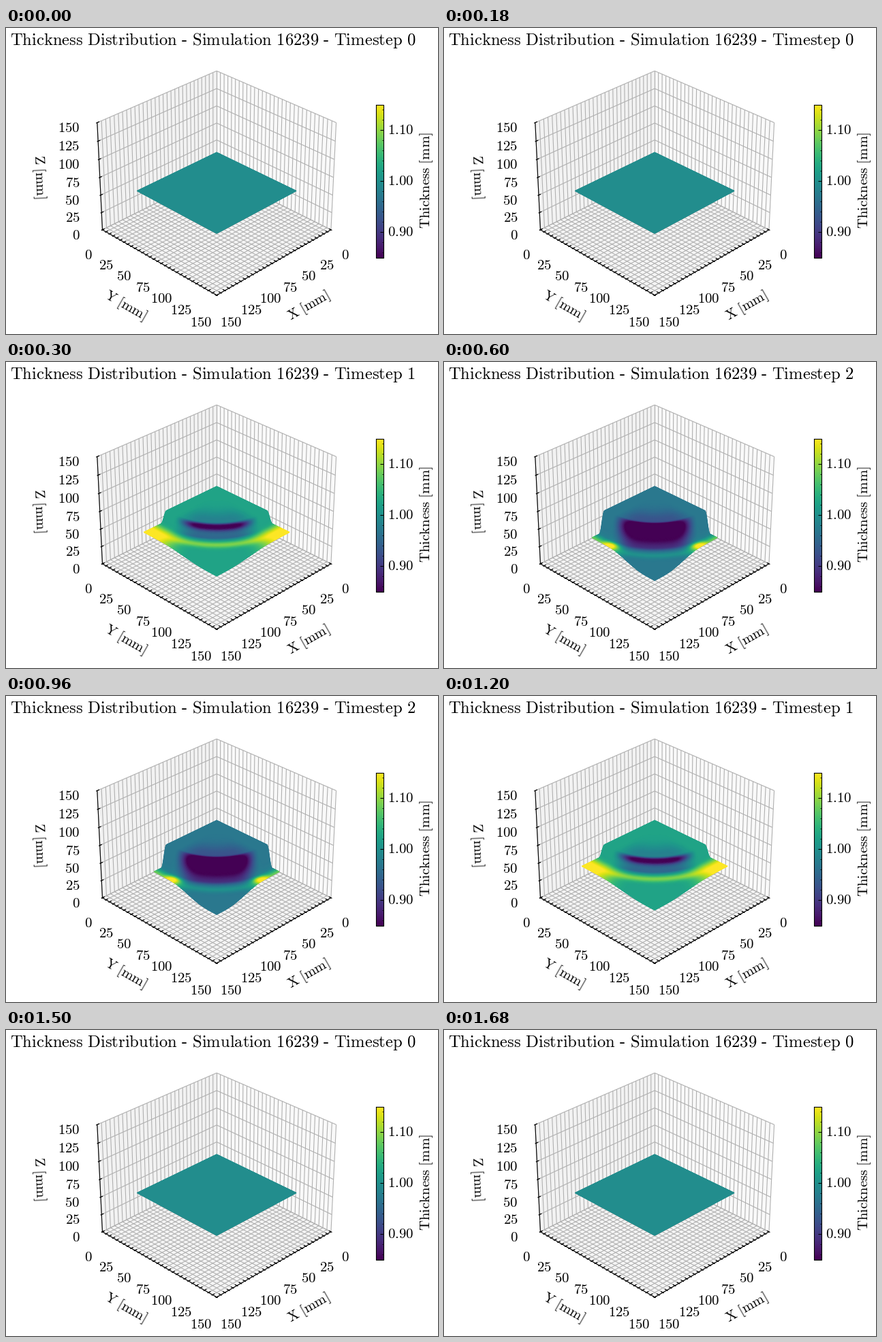
These frames come from a looping animation (634x450 px, 1800 ms). A matplotlib script:

```python
import numpy as np
import matplotlib.pyplot as plt
from matplotlib.animation import FuncAnimation
from matplotlib.collections import LineCollection

plt.rcParams["mathtext.fontset"] = "cm"

W, H, DPI = 634, 450, 100
CENTER, SCALE = (309.2, 219.7), 2037
SIZE = 150
TEXT, TITLE = 15, 17.75
FRAMES = 6

fig = plt.figure(figsize=(W / DPI, H / DPI), dpi=DPI, facecolor="white")
ax = fig.add_axes([0, 0, 1, 1])
ax.axis("off")


def project(x, y, z):
    """Perspective view from elevation 30, azimuth 45, in stage pixels."""
    x, y, z = (np.asarray(v, float) / SIZE - 0.5 for v in (x, y, z))
    x, y, z = 1.19048 * x, 1.19048 * y, 0.89286 * z
    along = (x + y) * np.sqrt(0.5)
    right = (y - x) * np.sqrt(0.5)
    up = -0.5 * along + 0.86603 * z
    depth = 10 - 0.86603 * along - 0.5 * z
    return CENTER[0] + SCALE * right / depth, CENTER[1] - SCALE * up / depth


def tex(s):
    return "$" + r"\ ".join(r"\text{%s}" % w for w in s.split()) + "$"


def write(x, y, s, size=TEXT, ha="center", va="center", rot=0):
    return ax.text(x, y, tex(s), fontsize=size, ha=ha, va=va, rotation=rot,
                   color="black", zorder=6)


def lines(segments, color, lw, z, snap=None):
    ax.add_collection(LineCollection(segments, colors=color, linewidths=lw,
                                     zorder=z, snap=snap), autolim=False)


def seg(p, q):
    return [project(*p), project(*q)]


def smooth(t):
    t = np.clip(t, 0, 1)
    return t * t * (3 - 2 * t)


def bump(v, mid, width):
    return np.exp(-((v - mid) / width) ** 2)


def draw_pane(p, q, gray):
    """Fill the face spanned by p and q from the far lower corner."""
    p, q = np.array(p), np.array(q)
    corners = [0 * p, p, p + q, q]
    ax.fill(*zip(*(project(*c) for c in corners)), color=str(gray), lw=0,
            zorder=1)


def draw_box():
    n, out, inn = SIZE, SIZE + 1.25, SIZE - 2.5
    draw_pane((0, n, 0), (0, 0, n), 0.975)
    draw_pane((n, 0, 0), (0, 0, n), 0.95)
    draw_pane((n, 0, 0), (0, n, 0), 0.9625)

    grid, ticks = [], []
    for v in range(0, n + 1, 5):
        grid += [seg((v, n, 0), (v, 0, 0)), seg((v, 0, 0), (v, 0, n)),
                 seg((n, v, 0), (0, v, 0)), seg((0, v, 0), (0, v, n))]
        ticks += [seg((v, out, 0), (v, inn, 0)),
                  seg((out, v, 0), (inn, v, 0))]
    for v in range(0, n + 1, 25):
        grid += [seg((n, 0, v), (0, 0, v)), seg((0, 0, v), (0, n, v))]
        ticks.append(seg((out, 0, v), (inn, 0, v)))
        shift = 37 + 3 * v / n
        x, y = project(v, n, 0)
        write(x + 20.7, y + shift, str(v))
        x, y = project(n, v, 0)
        write(x - 20.5 - 2.5 * v / n, y + shift, str(v))
        write(108.5, project(n, 0, v)[1] + 8, str(v), ha="right")
    axes = [seg((0, n, 0), (n, n, 0)), seg((n, 0, 0), (n, n, 0)),
            seg((n, 0, 0), (n, 0, n))]
    lines(grid, "#b0b0b0", 0.8, 2)
    lines(axes, "black", 0.8, 3)
    lines(ticks, "black", 0.9, 3)

    write(444, 408.5, "X [mm]", rot=29.7)
    write(175, 408.5, "Y [mm]", rot=-29.7)
    write(48, 218.5, "Z [mm]", rot=-87.5)


def draw_colorbar():
    left, right, top, bottom = 543.2, 554.2, 112.8, 337.8
    ax.imshow(np.linspace(1, 0, 256)[:, None], cmap="viridis", aspect="auto",
              extent=(left, right, bottom, top), zorder=3)
    ax.plot([left, right, right, left, left],
            [top, top, bottom, bottom, top], color="black", lw=0.8, zorder=5)
    for i in range(15):
        value = 0.86 + 0.02 * i
        y = bottom - (value - 0.85) / 0.3 * (bottom - top)
        major = i % 5 == 2
        lines([[(right - (5 if major else 2.6), y), (right, y)]], "black",
              0.8 if major else 0.6, 5, True)
        if major:
            write(560, y, f"{value:.2f}", ha="left")
    write(617.5, 224.5, "Thickness [mm]", rot=90)


def thickness(step, dist, angle):
    """Colour level from the distance to the wall and the corner angle."""
    if step == 0:
        return np.full(dist.shape, 0.487)
    k = smooth((np.sin(2 * angle) - 0.1) / 0.8)
    bent = (0.25 / step * bump(dist, 16, 6)
            - 0.14 * bump(dist, -8, 18)
            - 0.5 * bump(dist, -1.8, 1.5 * step ** 0.7)
            - 0.15 * bump(dist, 3, 4))
    rim = 0.45 * smooth(dist / 18)
    fold = 0.45 * (step - 1) * bump(angle, 0.19, 0.12) * bump(dist, 11, 6)
    return 0.76 - 0.18 * step + k * bent + (1 - k) * rim + fold


def sheet(step, n=200):
    """Quarter blank pressed over a punch with a rounded square outline."""
    side = 5.75 * step + 2.25 * step ** 2
    corner = 2.4 * step ** 2
    t = np.linspace(0, 1, n)
    edge = 102.8 - side + (side - corner) * smooth((t - 0.2) / 0.7)
    x, y = t[:, None] * edge[None, :], t[None, :] * edge[:, None]

    qx, qy = np.maximum(x - 10, 0), np.maximum(y - 10, 0)
    dist = np.hypot(qx, qy) - 60
    angle = np.arctan2(np.minimum(qx, qy), np.maximum(qx, qy))
    z = 56 - 14.9 * step * smooth((dist + 4) / 7)

    px, py = project(23.6 + x, 23.6 + y, z)
    level = np.clip(thickness(step, dist, angle), 0, 1)
    return ax.pcolormesh(px, py, level, cmap="viridis", vmin=0, vmax=1,
                         shading="gouraud", zorder=4)


draw_box()
draw_colorbar()
sheets = [sheet(step) for step in range(3)]
title = write(6.3, 25, "Timestep", TITLE, ha="left", va="baseline")
ax.set(xlim=(0, W), ylim=(H, 0))


def update(i):
    # Forward to the last step, hold, then back
    step = min(i, FRAMES - 1 - i)
    for j, mesh in enumerate(sheets):
        mesh.set_visible(j == step)
    title.set_text(tex("Thickness Distribution - Simulation 16239 - "
                       f"Timestep {step}"))
    return [*sheets, title]


anim = FuncAnimation(fig, update, frames=FRAMES, interval=300,
                     init_func=lambda: update(0), repeat=True, repeat_delay=0,
                     blit=False)
plt.show()
```
